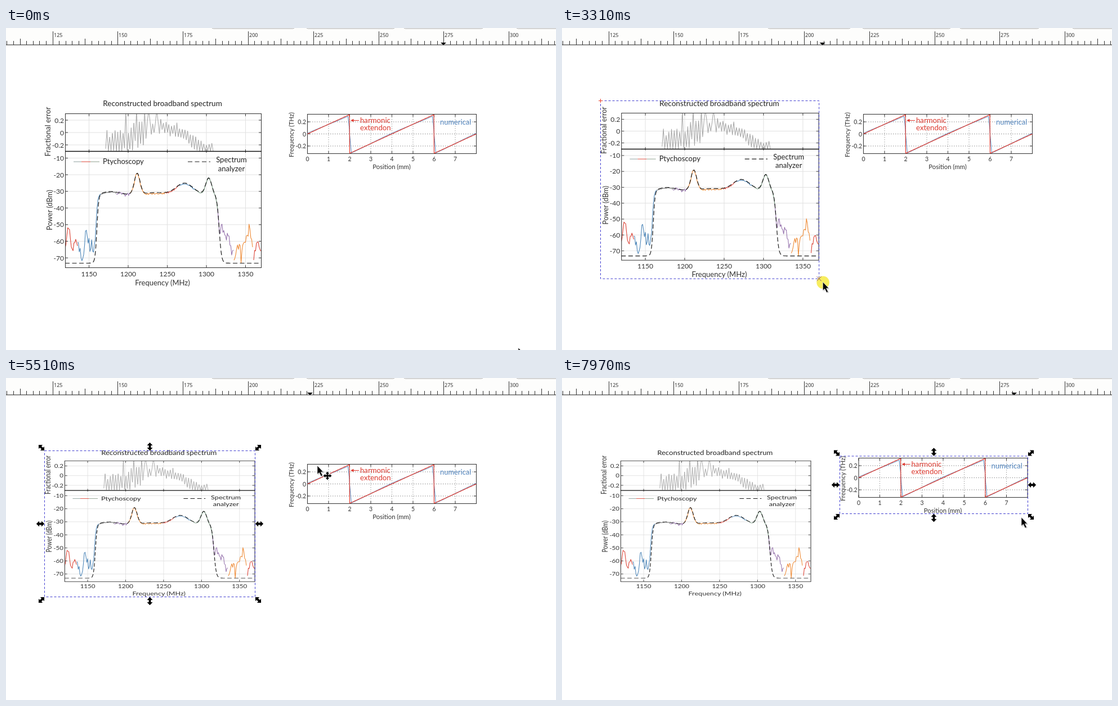
Animation, 977 px wide and 573 px high, one loop 8 s. Source, as an HTML page:

```html
<!DOCTYPE html>
<html lang="en">
<head>
<meta charset="utf-8">
<title>Resizing and moving plots</title>
<style>
html, body { margin: 0; width: 100%; height: 100%; overflow: hidden; background: #fff; }
svg { display: block; width: 977px; height: 573px; }
text { font-family: Lato, "Open Sans", sans-serif; }
#ruler text { font: 9px "Noto Sans", sans-serif; fill: #333; }
polyline { fill: none; stroke-linejoin: round; }
#arrow, #spoke, .solid { fill: #000; }
#box { fill: none; stroke: #4340d0; stroke-dasharray: 4 3; }
</style>
</head>
<body>
<svg viewBox="0 0 977 573" xmlns="http://www.w3.org/2000/svg">
  <defs>
    <clipPath id="upper"><rect x="106" y="153" width="347" height="66"/></clipPath>
    <clipPath id="lower"><rect x="105" y="220" width="349" height="206"/></clipPath>
    <path id="arrow" d="M0-7.2L5-2H1.9V2H5L0 7.2L-5 2H-1.9V-2H-5Z"/>
    <path id="spoke" d="M0-7.5L3.2-3.8H1.5V0H-1.5V-3.8H-3.2Z"/>
  </defs>
  <g id="plotA"></g>
  <g id="plotB"></g>
  <rect id="box"/>
  <g id="handles"></g>
  <path id="pin" d="M65 129.5H72M68.5 126V133" stroke="#e8402c"/>
  <g id="ruler"></g>
  <path id="marker" class="solid" d="M-5 26H5L0 30.5Z"/>
  <circle id="press" r="11.3" fill="#f5e93c" fill-opacity=".82"/>
  <path id="snap" d="M-4-4L4 4M-4 4L4-4" stroke="#8c4a5c"/>
  <g id="cursor">
    <path d="M1.5 1.5V17L5 14L8 20L11 18.6L8 13H12Z" opacity=".18"/>
    <path class="solid" d="M0 0V15.2L3.5 12.2L6.6 18.8L9.3 17.5L6.2 11.2H10.6Z" stroke="#ddd" stroke-width=".8"/>
    <g id="move" transform="translate(18 18)"></g>
  </g>
</svg>
<script>
const LOOP = 8000;
const RED = "#db4437", AMBER = "#ee8a35", BLUE = "#4d86b8", VIOLET = "#9673ad", GRAY = "#777", GREEN = "#71927a";
const INK = "#3c3c3c", GRID = "#e1e1e1";

const $ = id => document.getElementById(id);
const range = (n, f) => Array.from({ length: n }, (_, i) => f(i));
const line = (x1, y1, x2, y2, color, extra = "") =>
  `<line x1="${x1}" y1="${y1}" x2="${x2}" y2="${y2}" stroke="${color}" ${extra}/>`;
const label = (x, y, s, size = 13, anchor = "middle", color = "#333", extra = "") =>
  `<text x="${x}" y="${y}" font-size="${size}" text-anchor="${anchor}" fill="${color}" ${extra}>${s}</text>`;
const upright = (x, y, s, size) =>
  label(0, 0, s, size, "middle", "#333", `transform="translate(${x} ${y}) rotate(-90)"`);
const frame = (x, y, w, h) =>
  `<rect x="${x}" y="${y}" width="${w}" height="${h}" fill="none" stroke="${INK}" stroke-width="1.1"/>`;

// Polyline of f over [from, to]
function plot(f, from, to, step, color, extra = "") {
  const n = Math.round((to - from) / step);
  const points = range(n + 1, i => {
    const x = from + (to - from) * i / n;
    return [x, f(x, i)].map(v => v.toFixed(2));
  });
  return `<polyline points="${points.join(" ")}" stroke="${color}" ${extra}/>`;
}

let seed = 7;
const random = () => (seed = seed * 16807 % 2147483647) / 2147483647;
const jitter = size => (random() - .5) * size;
const bell = (x, mid, width) => Math.exp(-(((x - mid) / width) ** 2) / 2);
const bumps = (x, list) => list.reduce((sum, [mid, height, width]) => sum + height * bell(x, mid, width), 0);
const step = (x, mid, width) => 1 / (1 + Math.exp((mid - x) / width));

function drawRuler() {
  let s = `<rect width="977" height="30" fill="#fdfdfc"/>`;
  for (const [x, w] of [[365, 147], [533, 157], [706, 141], [906, 150]])
    s += `<rect x="${x}.5" y="-12" width="${w}" height="13" rx="3" fill="#fff" stroke="#aaa"/>`;
  for (let i = -8; i < 80; i++) {
    const x = Math.floor(83 + i * 11.58) + .5, k = (i + 10) % 10;
    s += line(x, k === 0 ? 6 : k === 5 ? 19 : 23, x, 30, "#333");
    if (k === 0) s += `<text x="${x + 1.5}" y="16">${125 + i * 2.5}</text>`;
  }
  $("ruler").innerHTML = s + line(0, 30, 977, 30, "#222", 'stroke-width="1.2"');
}

// Band with steep edges and three peaks
const FLOOR = 418.5;
const BAND = [[186, 5, 13], [233, 37, 5], [265, 3, 18], [317, 20, 15], [360, 29, 5.2]];
const signal = (x, edge = 161.5) =>
  FLOOR - (FLOOR - 296 + bumps(x, BAND)) * step(x, edge, 1.6) * step(-x, -378.7, 2.1);

// Noise floor with its larger spikes
const SPIKES = [[111, 24, 3.5], [135, -16, 2], [143, 30, 2], [384, 34, 8], [404, -20, 3],
  [418, -28, 1.2], [426, 10, 5], [432, 38, 1.3], [440, -22, 1.2]];
const noiseFloor = x => 388 + jitter(24) - bumps(x, SPIKES);

// From, to, colour, roughness on the band
const PIECES = [[105, 127, RED, 0], [127, 168, BLUE, 1], [168, 196, GRAY, 2], [196, 221, VIOLET, 6],
  [221, 284, AMBER, 4], [284, 308, RED, 3], [308, 336, BLUE, 2], [336, 376, GREEN, 2],
  [376, 404, VIOLET, 2], [405, 438, AMBER, 0], [440, 453, RED, 0]];

function errorAt(x, i) {
  const middle = 209 - 33 * bell(x, 275, 42) + 12 * bell(x, 352, 14);
  const swing = (x < 260 ? 8 : 4) + random() * (x < 260 ? 18 : 11);
  const spikes = [212, 232, 247, 254, 267].some(p => Math.abs(x - p) < 1.25);
  return spikes ? 146 : Math.min(219, middle + (i % 2 ? -swing : swing));
}

function drawSpectrum() {
  const xs = range(5, i => 147.5 + i * 69.5);
  const ys = range(7, i => 231.5 + i * 29.6);
  const top = [164, 186, 208];
  const dashed = 'stroke-width="1.2" stroke-dasharray="8 4.5"';
  let s = "";
  for (const x of xs) s += line(x, 153, x, 426, GRID);
  for (const y of [...top, ...ys]) s += line(106, y, 453, y, GRID);

  s += `<g clip-path="url(#upper)">${plot(errorAt, 177, 368, 2.4, "#a3a3a3")}</g>`;
  s += `<g clip-path="url(#lower)" stroke-width="1.1">`;
  for (const [from, to, color, rough] of PIECES)
    s += plot(x => Math.min(noiseFloor(x), signal(x, 159.5) + 1 + jitter(rough)), from, to, 1.6, color);
  s += plot(x => signal(x), 105, 453, 1, "#1a1a1a", dashed) + "</g>";

  for (const x of xs)
    for (const [y, d] of [[153, 4], [219, -3], [219, 3], [426, -4]]) s += line(x, y, x, y + d, INK);
  for (const y of [...top, ...ys]) s += line(106, y, 110, y, INK) + line(453, y, 449, y, INK);
  s += frame(105.5, 152.5, 348, 274) + line(105, 219.5, 454, 219.5, "#111", 'stroke-width="1.6"');

  xs.forEach((x, i) => s += label(x, 441.5, 1150 + i * 50, 12));
  ys.forEach((y, i) => s += label(103, y + 4.5, -10 - i * 10, 12, "end"));
  top.forEach((y, i) => s += label(103, y + 4.5, ["0.2", "0", "-0.2"][i], 12, "end"));
  s += label(278, 139.3, "Reconstructed broadband spectrum", 13.5, "middle", "#222")
    + label(278, 457.5, "Frequency (MHz)")
    + upright(79, 184.5, "Fractional error", 13) + upright(81.5, 324, "Power (dBm)", 13);
  s += line(120, 238, 134, 238, "#8b9d9b") + line(134, 238, 150, 238, RED) + line(150, 238, 166, 238, "#8b9d8b")
    + line(323, 238, 363, 238, "#1a1a1a", dashed)
    + label(172, 242, "Ptychoscopy", 13, "start", "#222")
    + label(400.5, 239.3, "Spectrum", 13, "middle", "#222")
    + label(400.5, 255, "analyzer", 13, "middle", "#222");
  $("plotA").innerHTML = s;
}

// Sawtooth in -1..1 with a period of 4 mm, and its rounded version
const saw = p => ((p + 2) % 4 - 2) / 2;
const rounded = p => range(13, i => saw(p + (i - 6) * .012)).reduce((a, b) => a + b) / 13;

function drawSawtooth() {
  const red = "#dc3a30", blue = "#4f83bd";
  const ys = [167, 188.5, 210];
  const dots = 'stroke-dasharray="1.5 2.5"';
  const position = x => (x - 535.5) / 37.5;
  let s = "";
  for (const y of ys) s += line(536, y, 835, y, "#888", dots);
  range(8, i => {
    const x = 535.5 + i * 37.5;
    if (i) s += line(x, 154, x, 223, "#999", dots);
    s += line(x, 223, x, 219, INK) + line(x, 154, x, 158, INK) + label(x, 236.5, i, 10.5);
  });
  ys.forEach((y, i) => s += line(536, y, 540, y, INK) + line(835, y, 831, y, INK)
    + label(533, y + 4, ["0.2", "0", "-0.2"][i], 10.5, "end"));
  s += frame(535.5, 153.5, 300, 70);
  const bowed = x => {
    const v = rounded(position(x));
    return 188.5 - 34 * v - 1.3 * Math.cos(Math.PI * v);
  };
  s += plot(bowed, 535.5, 835.5, .5, blue)
    + plot(x => 188.5 - 34.5 * saw(position(x)), 535.5, 835.5, .5, red, 'stroke-width="1.2"');
  s += line(615, 164.5, 627, 164.5, red) + `<path d="M612 164.5L617.5 161.8V167.2Z" fill="${red}"/>`;
  s += label(629, 169, "harmonic", 13.2, "start", red) + label(629, 182, "extendon", 13.2, "start", red)
    + label(771, 172, "numerical", 12.9, "start", blue)
    + label(685, 251, "Position (mm)", 11.3) + upright(511, 190, "Frequency (THz)", 11.2);
  $("plotB").innerHTML = s;
}

// Key poses: time, x, y
const pointer = [[70, 910, 569], [730, 424, 421], [1870, 425, 423], [1950, 459, 436],
  [2660, 462, 468], [3100, 462, 468], [3800, 468, 394], [3930, 461, 392], [4670, 453, 395],
  [5200, 450, 396], [5510, 553, 156], [5900, 556.5, 144.5], [6250, 556.5, 144.5],
  [6930, 549, 137], [7450, 548, 134], [7970, 816, 248]];
const corner = [[3100, 454, 461], [3800, 466, 393], [3930, 460, 393], [4670, 446.5, 387], [4900, 442.5, 389.5]];
const offset = [[6250, 0, 0], [6930, -7.5, -7.5], [7060, -7.5, -7.5], [7320, -8.5, -11]];

function pose(keys, t) {
  const next = keys.findIndex(k => k[0] > t);
  if (next === 0) return keys[0].slice(1);
  if (next < 0) return keys[keys.length - 1].slice(1);
  const a = keys[next - 1], b = keys[next];
  const u = (t - a[0]) / (b[0] - a[0]), eased = u * u * (3 - 2 * u);
  return [1, 2].map(k => a[k] + (b[k] - a[k]) * eased);
}

const show = (id, on) => $(id).setAttribute("visibility", on ? "visible" : "hidden");
const place = (id, x, y) => $(id).setAttribute("transform", `translate(${x} ${y})`);
const within = (t, ...spans) => spans.some(([a, b]) => t >= a && t < b);

const SIDES = range(9, k => [k % 3 - 1, Math.floor(k / 3) - 1]).filter(([i, j]) => i || j);

function select(x, y, width, height) {
  Object.entries({ x, y, width, height }).forEach(([k, v]) => $("box").setAttribute(k, v));
  SIDES.forEach(([i, j], k) => {
    const gap = i && j ? 5.5 : 7.5;
    const turn = i && j ? -45 * i * j : i ? 90 : 0;
    const hx = x + width / 2 + i * (width / 2 + gap), hy = y + height / 2 + j * (height / 2 + gap);
    $("handles").children[k].setAttribute("transform", `translate(${hx} ${hy}) rotate(${turn})`);
  });
}

function render(t) {
  const [px, py] = pose(pointer, t);
  const [cx, cy] = pose(corner, t);
  const [dx, dy] = pose(offset, t);
  $("plotA").setAttribute("transform",
    `translate(68 129) scale(${(cx - 68) / 386} ${(cy - 129) / 332}) translate(-68 -129)`);
  place("plotB", dx, dy);

  if (t < 6200) select(68.5, 129.5, cx - 68.5, cy - 129.5);
  else select(502 + dx, 150 + dy, 334, 102.5);
  show("box", t >= 1190);
  show("handles", within(t, [1190, 3040], [4980, 6200], [7400, LOOP]));

  const resizing = within(t, [3040, 4980]);
  show("pin", resizing);
  show("snap", resizing);
  place("snap", cx, cy);
  show("press", resizing || within(t, [1050, 1190], [5950, 7400]));
  place("press", px + .3, py + .8);
  place("cursor", px, py);
  show("move", within(t, [660, 1880], [5420, 7480]));
  // The ruler marker trails the pointer
  place("marker", t < 70 ? 777 : pose(pointer, t - 70)[0], 0);
}

drawRuler();
drawSpectrum();
drawSawtooth();
$("handles").innerHTML = '<use href="#arrow"/>'.repeat(SIDES.length);
$("move").innerHTML = range(4, i =>
  `<use href="#spoke" transform="rotate(${i * 90})" stroke="#fff" stroke-width="1.6" style="paint-order:stroke"/>`).join("")
  + '<path class="solid" d="M0-3L3 0L0 3L-3 0Z"/>';

const start = performance.now();
function tick() {
  render((performance.now() - start) % LOOP);
  requestAnimationFrame(tick);
}
tick();
</script>
</body>
</html>
```
